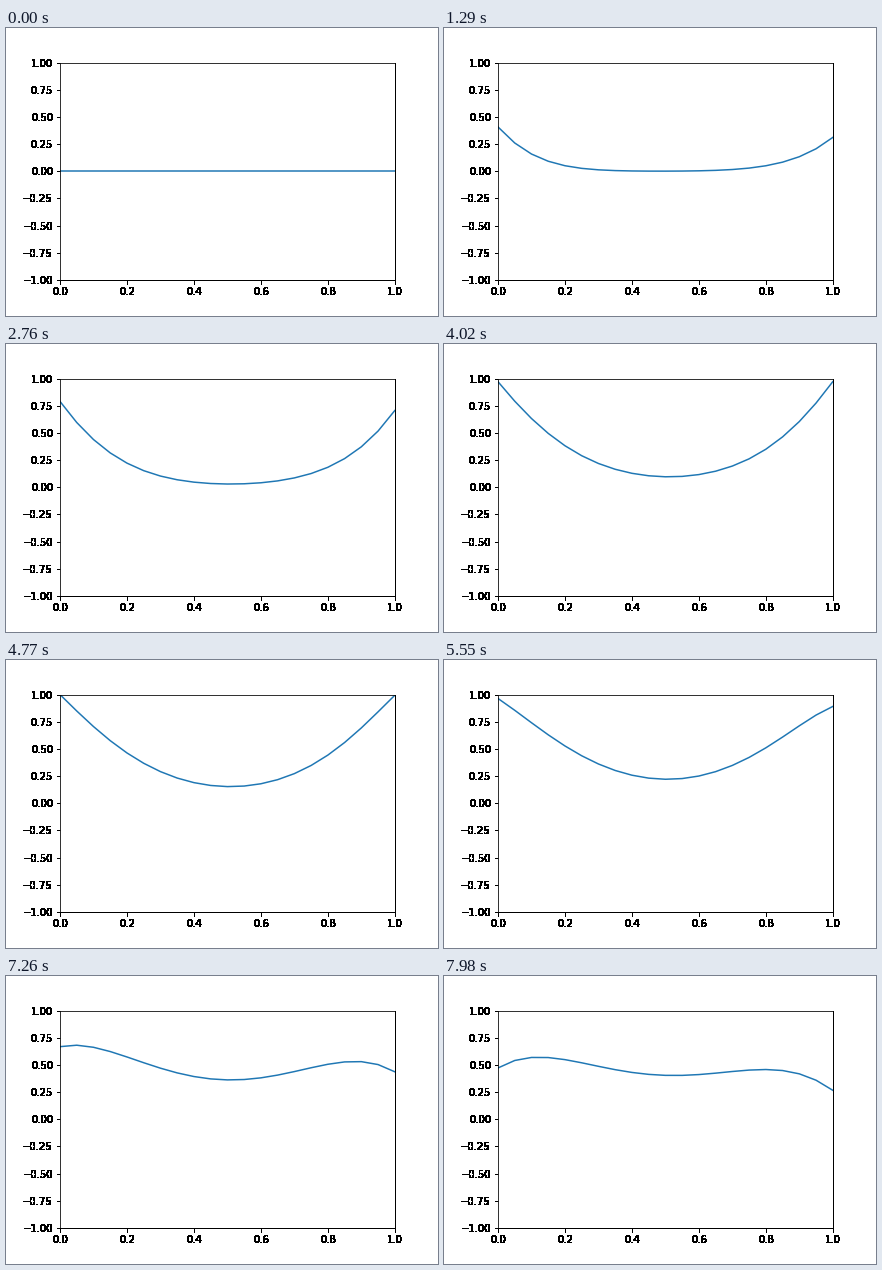
These frames come from a looping animation (432x288 px, 8000 ms). A matplotlib script:

```python
import numpy as np
import matplotlib.pyplot as plt
from matplotlib.animation import FuncAnimation

LOOP_MS, TICK_MS, STEP_MS = 8000, 10, 30
STEPS = LOOP_MS // STEP_MS + 1
DIFFUSIVITY, DT = 0.04, 0.01

plt.rcParams["font.family"] = "DejaVu Sans"
plt.rcParams["font.size"] = 10


def solve_heat(x):
    """Explicit heat equation, driven by a sine (left) and a bell (right)."""
    r = DIFFUSIVITY * DT / (x[1] - x[0]) ** 2
    u = np.zeros_like(x)
    states = [u]
    for k in range(STEPS - 1):
        t = k * DT
        u = u.copy()
        u[1:-1] += r * (u[2:] - 2 * u[1:-1] + u[:-2])
        u[0] = np.sin(t)
        u[-1] = np.exp(-(t - 1.5) ** 2)
        states.append(u)
    return states


def hard_ink(fig):
    """Draw the figure on a clear ground and return its ink without soft edges."""
    fig.set_facecolor("none")
    fig.canvas.draw()
    rgba = np.array(fig.canvas.buffer_rgba())
    fig.set_facecolor("white")
    ink = np.zeros_like(rgba)
    ink[..., 3] = np.where(rgba[..., 3] > 0, 255 - rgba[..., 0], 0)
    return ink


fig = plt.figure(figsize=(6, 4), dpi=72)
ax = fig.add_axes([0.125, 0.125, 0.775, 0.755])
ax.set_xlim(0, 1)
ax.set_ylim(-1, 1)
ax.set_yticks(np.linspace(-1, 1, 9))

# The axes never change: draw them once, then lay them over the curve.
frame_ink = hard_ink(fig)
ax.set_axis_off()
fig.figimage(frame_ink, 0, 0, origin="upper", zorder=5)

x = np.linspace(0, 1, 21)
states = solve_heat(x)
line, = ax.plot(x, states[0], color="C0", lw=1.5)


def update(i):
    line.set_ydata(states[i * TICK_MS // STEP_MS])
    return line,


def init():
    return update(0)


anim = FuncAnimation(fig, update, frames=LOOP_MS // TICK_MS, init_func=init,
                     interval=TICK_MS, repeat=True, repeat_delay=0)
plt.show()
```
